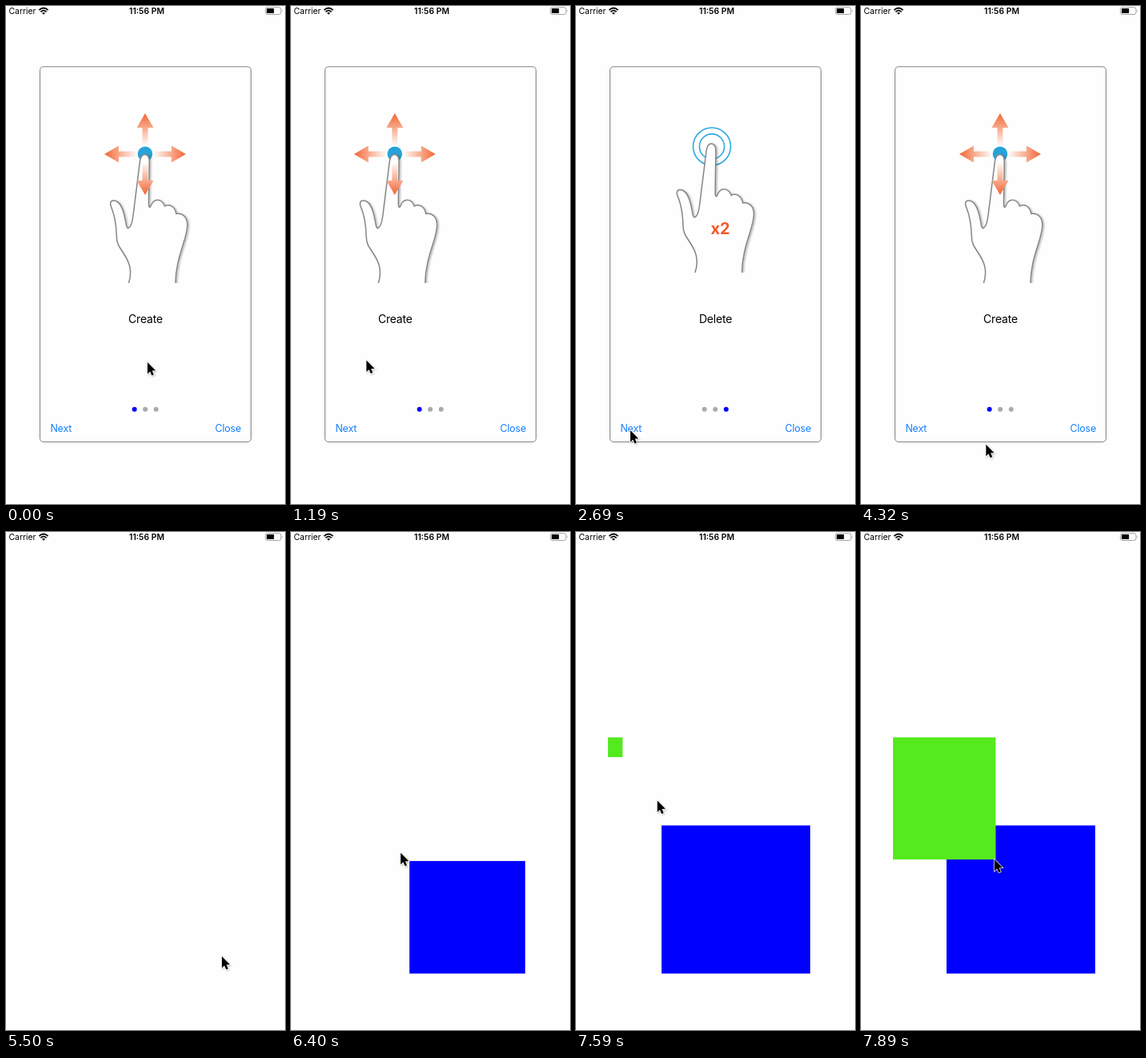
Write an HTML page that moves like this. It is 349 by 622 pixels and loops after 8 s.

```html
<!DOCTYPE html>
<html lang="en">
<head>
<meta charset="utf-8">
<title>Gesture guide</title>
<style>
  html, body { margin: 0; width: 100%; height: 100%; overflow: hidden; background: #fefefe; }
  svg { display: block; width: 100vw; height: 100vh; }
  text { font-family: Inter, Roboto, sans-serif; }
  .bar { font-size: 10.4px; }
  .label { font-size: 14px; letter-spacing: -0.2px; text-anchor: middle; }
  .button { font-size: 12.5px; letter-spacing: -0.2px; fill: #147efb; }
  .ring { fill: none; stroke: #2fa9df; stroke-width: 1.6; }
</style>
</head>
<body>
<svg viewBox="0 0 349 622" preserveAspectRatio="none">
  <defs>
    <linearGradient id="fade" x1="0" y1="134" x2="0" y2="174" gradientUnits="userSpaceOnUse">
      <stop offset="0" stop-color="#f26535"/>
      <stop offset="0.45" stop-color="#f8a88a"/>
      <stop offset="1" stop-color="#fefaf8"/>
    </linearGradient>
    <!-- The region ends at the wrist, which stays open. -->
    <filter id="lift" filterUnits="userSpaceOnUse" x="120" y="180" width="115" height="166">
      <feDropShadow dx="1.6" dy="0.8" stdDeviation="1" flood-color="#000" flood-opacity="0.28"/>
    </filter>
    <filter id="soft" x="-30%" y="-20%" width="180%" height="160%">
      <feDropShadow dx="0.8" dy="1" stdDeviation="0.9" flood-color="#000" flood-opacity="0.3"/>
    </filter>
    <clipPath id="inside"><rect x="43" y="76" width="263" height="468" rx="4"/></clipPath>
    <path id="arrow" fill="url(#fade)" d="M174 134L184.5 152H177.5V173H170.5V152H163.5Z"/>
    <path id="hand" fill="#fefefe" stroke="#858585" stroke-width="1.5" filter="url(#lift)"
      d="M153.2 347C159.500 329 152.500 317 146.500 308C140.500 299 138.500 296 138.400 288C138 274 136.500 263 132 252C129.500 247 130.500 243 134.400 243C142.400 243 146.500 252 149.400 268C150.400 274 151 278 153 277.500C156.500 276 158 270 159 262L167.500 194C168.500 188 170 185.500 173.600 185.500C177.500 185.500 179.500 189 179.300 195L178.500 246C178.500 252 180 252.500 181.500 249C185 240 195 240 198.500 250C203 247 211 249 213 259.500C221 258 227.500 264 226.800 275C226 293 212 315 212 347"/>
  </defs>

  <rect width="349" height="622" fill="#fefefe"/>

  <text class="bar" x="3.500" y="10.300">Carrier</text>
  <g fill="none" stroke="#000" stroke-width="1.700">
    <path d="M41.400 5.200Q47 -0.200 52.600 5.200"/>
    <path d="M43.400 7.300Q47 3.900 50.600 7.300"/>
  </g>
  <path d="M45 8.800Q47 7 49 8.800L47 10.800Z"/>
  <text class="bar" x="176" y="10.300" text-anchor="middle" font-weight="600">11:56 PM</text>
  <rect x="324.500" y="1.700" width="19.500" height="8.800" rx="2.400" fill="none" stroke="#999" stroke-width="0.900"/>
  <rect x="326" y="3.100" width="9.200" height="6" rx="0.900"/>
  <path d="M345 4.600Q346.600 6.100 345 7.600Z" fill="#999"/>

  <g id="card">
    <rect x="42.500" y="75.800" width="264" height="468.700" rx="4.500" fill="#fefefe" stroke="#808080"/>
    <g clip-path="url(#inside)">
      <g id="pages">
        <g>
          <use href="#arrow"/>
          <use href="#arrow" transform="rotate(90 174 185)"/>
          <use href="#arrow" transform="rotate(-90 174 185)"/>
          <circle cx="174" cy="184.800" r="9.300" fill="#27a3da"/>
          <use href="#hand"/>
          <use href="#arrow" transform="rotate(180 174 185)"/>
          <text class="label" x="174.500" y="396">Create</text>
        </g>
        <g transform="translate(265)">
          <circle class="ring" cx="170" cy="175.500" r="15.600"/>
          <use href="#hand" x="-4.400" y="-13.500"/>
          <text class="label" x="174.500" y="396">Move</text>
        </g>
        <g transform="translate(530)">
          <circle class="ring" cx="170" cy="175.500" r="23.500"/>
          <circle class="ring" cx="170" cy="175.500" r="15.600"/>
          <use href="#hand" x="-4.400" y="-13.500"/>
          <text x="180.500" y="285" text-anchor="middle" font-size="20" font-weight="700" fill="#f15a29">x2</text>
          <text class="label" x="174.500" y="396">Delete</text>
        </g>
      </g>
    </g>
    <g id="dots">
      <circle cx="160.700" cy="503.700" r="3"/>
      <circle cx="174.200" cy="503.700" r="3"/>
      <circle cx="187.800" cy="503.700" r="3"/>
    </g>
    <text id="next" class="button" x="55.400" y="532.300">Next</text>
    <text class="button" x="294" y="532.300" text-anchor="end">Close</text>
  </g>

  <rect id="blue" fill="#0000fe"/>
  <rect id="green" fill="#54ea1e"/>
  <path id="cursor" d="M0 0V14.500L3.200 11.500L5.400 16.500L7.900 15.400L5.800 10.600L10.200 10.200Z"
    stroke="#fff" stroke-width="1.300" paint-order="stroke" filter="url(#soft)"/>
</svg>
<script>
  const LOOP = 8000, STEP = 148.5, PAGE = 265;
  const CLOSE = 37, TAPS = [16, 24];
  const el = id => document.getElementById(id);
  const [card, pages, dots, next, cursor] = ["card", "pages", "dots", "next", "cursor"].map(el);

  const clamp = u => Math.max(0, Math.min(1, u));
  const smooth = u => u * u * (3 - 2 * u);
  const easeOut = u => 1 - (1 - u) ** 2;

  // Each move eases to (x, y) between two steps; bow bends its path downwards.
  const pointerStart = [177, 445];
  const pointerMoves = [
    { from: 5.5, to: 10, x: 74, y: 442, bow: 0 },
    { from: 10, to: 13, x: 68, y: 530, bow: 0 },
    { from: 28, to: 32, x: 270, y: 530, bow: 18 },
    { from: 38, to: 40, x: 306, y: 560, bow: 0 },
    { from: 40, to: 45, x: 105, y: 366, bow: 7 },
    { from: 45, to: 50, x: 25, y: 234, bow: 0 },
    { from: 50.05, to: 53, x: 167, y: 409, bow: 7 }
  ];
  const boxes = [
    { node: el("blue"), corner: [293, 551.5], drag: { from: 40.3, to: 45.4, x: 107, y: 366.5, bow: 5 } },
    { node: el("green"), corner: [40, 256.5], drag: { from: 50.84, to: 53, x: 168.5, y: 409, bow: 6 } }
  ];

  function glide([x, y], m, k) {
    const u = easeOut(clamp((k - m.from) / (m.to - m.from)));
    return [x + (m.x - x) * u, y + (m.y - y) * u + m.bow * 4 * u * (1 - u)];
  }

  function drawBox({ node, corner, drag }, k) {
    const [x0, y0] = corner, [x1, y1] = glide(corner, drag, k);
    node.setAttribute("x", Math.min(x0, x1));
    node.setAttribute("y", Math.min(y0, y1));
    node.setAttribute("width", Math.abs(x1 - x0));
    node.setAttribute("height", Math.abs(y1 - y0));
  }

  function drawCard(k) {
    const swipe = smooth(clamp((k - 7.3) / 2.7));
    const taps = TAPS.filter(s => k > s).length;
    const page = (Math.floor(swipe) + taps) % 3;
    const offset = PAGE * (taps ? page : swipe);
    pages.setAttribute("transform", `translate(${-offset})`);
    [...dots.children].forEach((d, i) => d.setAttribute("fill", i === page ? "#0000fe" : "#aaa"));
    const age = Math.min(...TAPS.filter(s => k >= s).map(s => k - s));
    next.setAttribute("opacity", Math.min(1, 0.25 + 0.38 * age));
    card.setAttribute("visibility", k < CLOSE ? "visible" : "hidden");
  }

  function draw(t) {
    // The screen refreshes in coarse steps.
    const k = Math.floor((t + 3) / STEP);
    drawCard(k);
    boxes.forEach(b => drawBox(b, k));
    const tip = pointerMoves.reduce((p, m) => glide(p, m, k), pointerStart);
    cursor.setAttribute("transform", `translate(${tip})`);
  }

  function tick() {
    draw(performance.now() % LOOP);
    requestAnimationFrame(tick);
  }
  tick();
</script>
</body>
</html>
```
